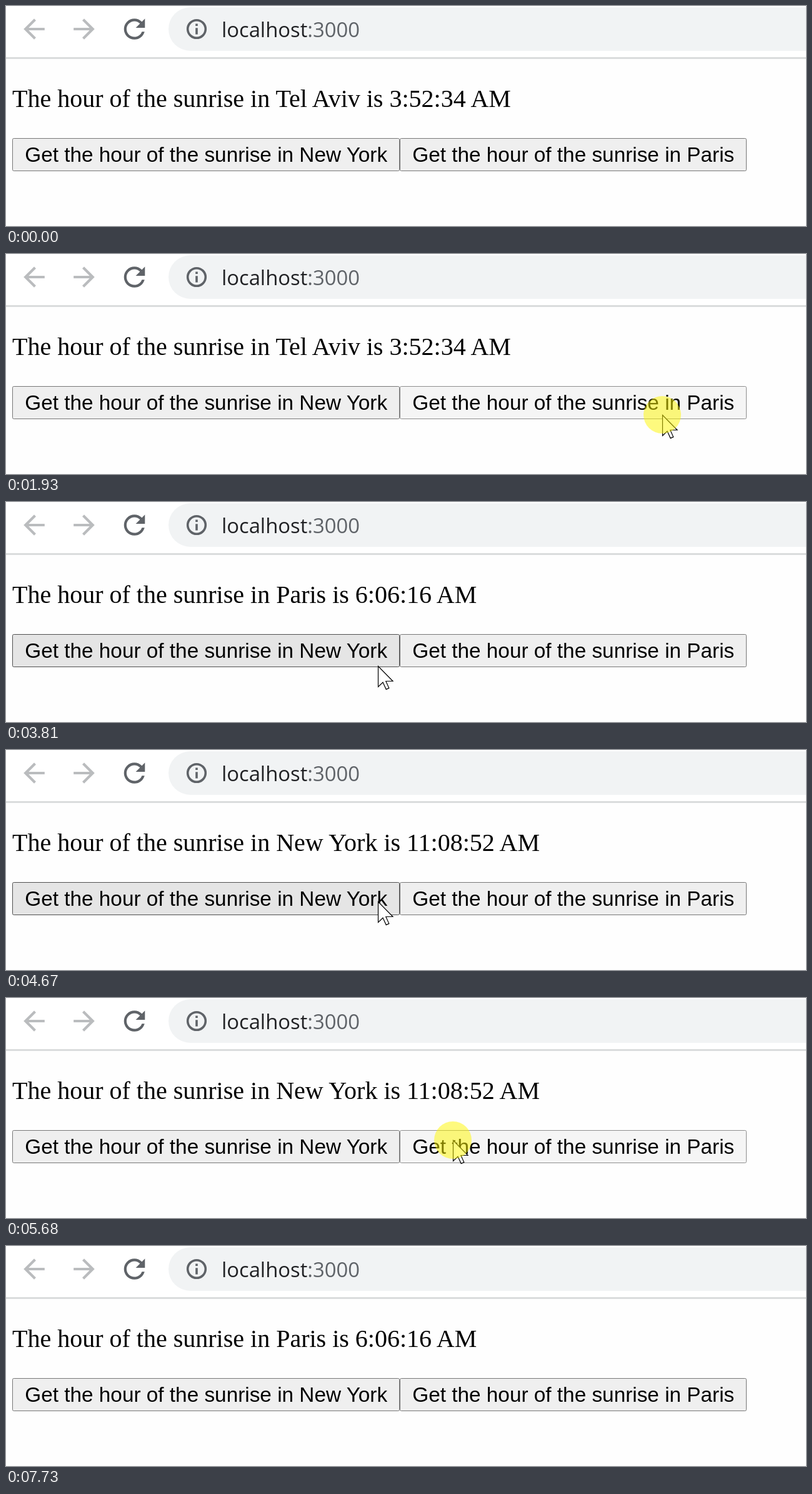
An HTML page that plays this animation: 1280x353 px, repeating every 8.51 s.

```html
<!DOCTYPE html>
<html lang="en">
<head>
<meta charset="utf-8">
<title>Sunrise hour</title>
<style>
  html, body { margin: 0; width: 100%; height: 100%; overflow: hidden; background: #fefefe; }
  svg { display: block; }
  .url { font: 32.75px "Open Sans", "Noto Sans", sans-serif; fill: #202124; }
  .port { fill: #5f6368; }
  .line { font: 40px "Liberation Serif", "Times New Roman", serif; }
  .button text { font: 33.333px "Liberation Sans", Arial, sans-serif; }
  .button rect { fill: #efefef; stroke: #767676; }
  .button.hover rect { fill: #e5e5e5; stroke: #4f4f4f; }
  .button.active rect { fill: #f5f5f5; stroke: #8d8d8d; }
</style>
</head>
<body>
<svg width="1280" height="353" viewBox="0 0 1280 353">
  <defs>
    <path id="arrow" d="M8 -1H-4.17L1.42 -6.59L0 -8L-8 0L0 8L1.41 6.59L-4.17 1H8Z"/>
  </defs>

  <rect width="1280" height="82" fill="#fff"/>
  <rect y="82" width="1280" height="3" fill="#dadcdd"/>
  <g fill="#babcbe">
    <use href="#arrow" transform="translate(45 37) scale(2.1)"/>
    <use href="#arrow" transform="translate(125 37) scale(-2.1 2.1)"/>
  </g>
  <path fill="#5f6368" transform="translate(205.5 37) scale(2.1) translate(-12 -12)"
    d="M17.65 6.35C16.2 4.9 14.21 4 12 4c-4.42 0-7.99 3.58-7.99 8s3.57 8 7.99 8c3.73 0 6.84-2.55 7.73-6h-2.08c-.82 2.33-3.04 4-5.65 4-3.31 0-6-2.69-6-6s2.69-6 6-6c1.66 0 3.14.69 4.22 1.78L13 11h7V4z"/>

  <rect x="260" y="2" width="1100" height="70" rx="35" fill="#f1f3f4"/>
  <circle cx="305" cy="37" r="14.3" fill="none" stroke="#5f6368" stroke-width="3.6"/>
  <path d="M303.2 28.4h3.6v3.6h-3.6zM303.2 35.3h3.6v10.3h-3.6z" fill="#5f6368"/>
  <text class="url" x="345" y="50">localhost<tspan class="port">:3000</tspan></text>

  <text class="line" id="line" x="10" y="162"></text>

  <g class="button">
    <rect x="10.5" y="212.5" width="619" height="52" rx="2"/>
    <text x="30.25" y="250">Get the hour of the sunrise in New York</text>
  </g>
  <g class="button">
    <rect x="630.5" y="212.5" width="554" height="52" rx="2"/>
    <text x="650.25" y="250">Get the hour of the sunrise in Paris</text>
  </g>

  <g id="pointer">
    <path d="M.5 .5V33.5L8 26.3L13.2 37.6L17.8 35.6L12.8 24.5H24Z" fill="#fff" stroke="#000" stroke-width="1.2"/>
    <circle id="halo" r="30" fill="#fff800" fill-opacity=".5"/>
  </g>
</svg>

<script>
const LOOP = 8510;
const PRESS = 75;

// The pointer starts and ends below the stage.
const entry = [1072, 365];
const glides = [
  { start: 590, end: 980, steps: 6, to: [1050, 258] },
  { start: 3330, end: 3810, steps: 7, to: [595, 263], dip: 37 },
  { start: 3880, end: 3960, steps: 2, to: [595, 243] },
  { start: 5280, end: 5510, steps: 4, to: [715, 228] },
  { start: 7560, end: 7730, steps: 3, to: [745, 380] }
];

// Each press brings its answer a moment later.
const clicks = [
  { press: 1930, answer: 2390, text: "Paris is 6:06:16 AM" },
  { press: 4210, answer: 4670, text: "New York is 11:08:52 AM" },
  { press: 5680, answer: 6150, text: "Paris is 6:06:16 AM" }
];

const byId = id => document.getElementById(id);
const line = byId("line"), pointer = byId("pointer"), halo = byId("halo");
const buttons = [...document.querySelectorAll(".button")];

const smooth = p => p * p * (3 - 2 * p);
const mix = (a, b, p) => a + (b - a) * p;

function pointerAt(t) {
  let [x, y] = entry;
  for (const { start, end, steps, to, dip = 0 } of glides) {
    if (t < start) break;
    const step = 1 + Math.floor((t - start) * (steps - 1) / (end - start));
    const p = smooth(Math.min(1, step / steps));
    x = mix(x, to[0], p);
    y = mix(y, to[1], p) + dip * Math.sin(Math.PI * p);
  }
  return [x, y].map(Math.round);
}

function textAt(t) {
  const answered = clicks.filter(c => t >= c.answer).pop();
  return answered ? answered.text : "Tel Aviv is 3:52:34 AM";
}

function isOver(button, x, y) {
  const box = button.querySelector("rect").getBBox();
  return x >= box.x && x <= box.x + box.width && y >= box.y && y <= box.y + box.height;
}

function draw(t) {
  const [x, y] = pointerAt(t);
  const pressed = clicks.some(c => t >= c.press && t < c.press + PRESS);

  line.textContent = "The hour of the sunrise in " + textAt(t);
  pointer.setAttribute("transform", `translate(${x} ${y})`);
  halo.setAttribute("visibility", pressed ? "visible" : "hidden");

  for (const button of buttons) {
    const over = isOver(button, x, y);
    button.classList.toggle("hover", over && !pressed);
    button.classList.toggle("active", over && pressed);
  }
}

const start = performance.now();
function tick() {
  draw((performance.now() - start) % LOOP);
  requestAnimationFrame(tick);
}
tick();
</script>
</body>
</html>
```
